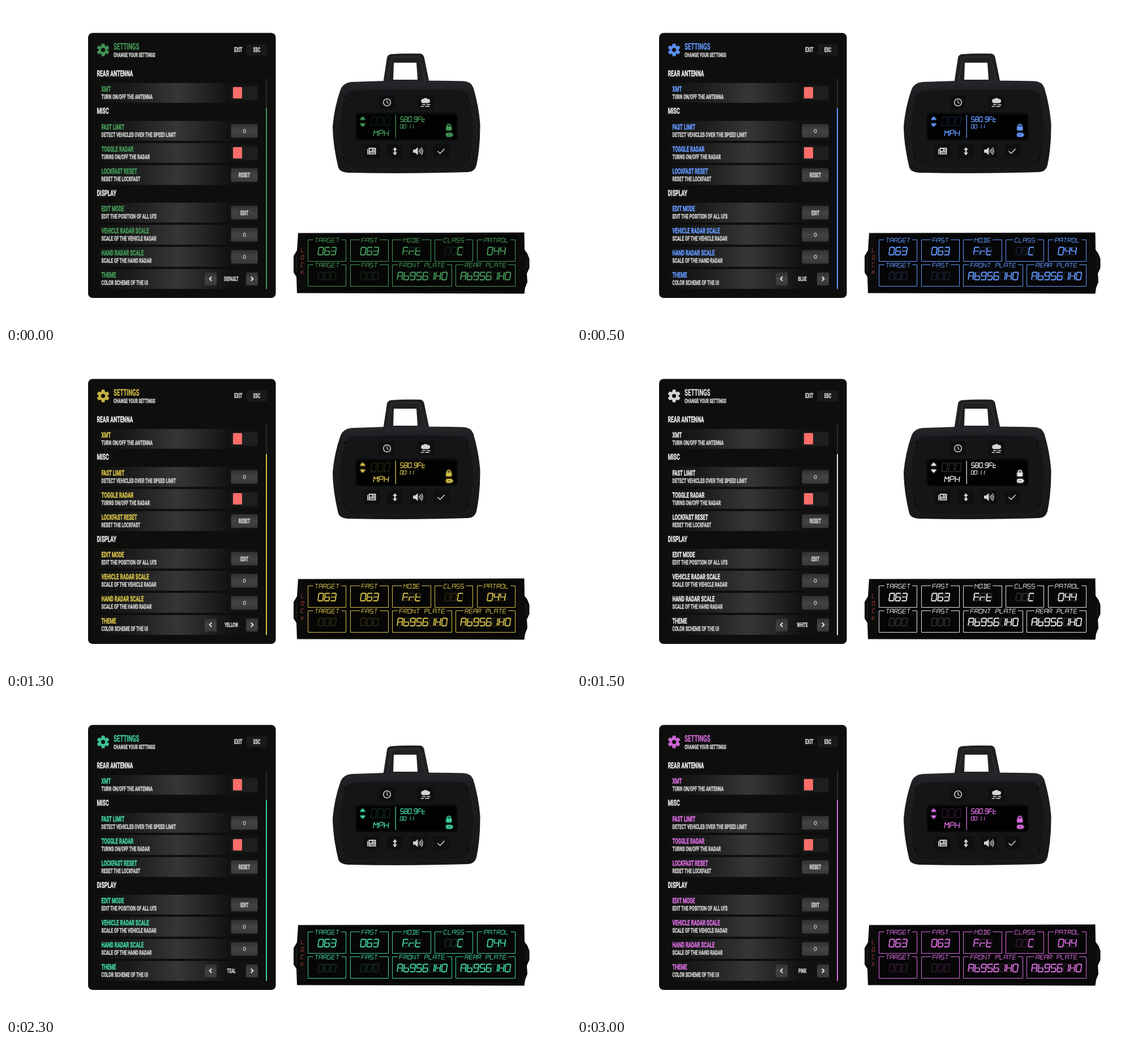
Recreate the animation shown at these times as an HTML page. Size 998 px wide and 561 px high, loop 3500 ms.

```html
<!DOCTYPE html>
<html lang="en">
<head>
<meta charset="utf-8">
<title>Radar settings themes</title>
<style>
html, body { margin: 0; width: 100%; height: 100%; overflow: hidden; background: #fff; }
svg { display: block; width: 998px; height: 561px; --c: #459a59; }
text { font: 700 11.25px Roboto, "Open Sans", sans-serif; fill: #cfcfcd; stroke: #cfcfcd; stroke-width: .55; text-rendering: geometricPrecision; }
.title { font-size: 16px; stroke-width: .2; }
.sub, .pick { font-size: 10.4px; }
.head { font-size: 14.4px; fill: #e8e8e6; stroke: #e8e8e6; }
.item { font-size: 13px; }
.item, .title { fill: var(--c); stroke: var(--c); }
.exit { font-size: 11.7px; }
.num { font: 500 9.5px Inter, sans-serif; stroke: none; fill: #ddd; }
.on { fill: var(--c); }
.line { fill: none; stroke: var(--c); }
.red { fill: none; stroke: #a23a32; }
.ghost { opacity: .2; }
.glow { filter: drop-shadow(0 0 1.5px var(--c)); }
.ico { fill: #d4d4d4; }
.ico-line { fill: none; stroke: #d4d4d4; stroke-width: 1.6; }
</style>
</head>
<body>
<svg id="stage" viewBox="0 0 998 561" xmlns="http://www.w3.org/2000/svg">
<defs>
  <linearGradient id="row">
    <stop offset="0" stop-color="#0f0f0e"/><stop offset=".2" stop-color="#1b1b1b"/>
    <stop offset=".5" stop-color="#363636"/><stop offset=".62" stop-color="#2a2a2a"/>
    <stop offset=".82" stop-color="#121212"/><stop offset="1" stop-color="#101010"/>
  </linearGradient>
  <linearGradient id="btn" x2="0" y2="1">
    <stop offset="0" stop-color="#303030"/><stop offset=".5" stop-color="#434343"/><stop offset="1" stop-color="#383838"/>
  </linearGradient>
  <linearGradient id="shell" x2="0" y2="1">
    <stop offset="0" stop-color="#25272a"/><stop offset=".15" stop-color="#1b1d1f"/><stop offset="1" stop-color="#161719"/>
  </linearGradient>
</defs>
<g id="panel"></g>
<g id="hand"></g>
<g id="bar"></g>
</svg>
<script>
const THEMES = [
  ['DEFAULT', '#459a59'], ['BLUE', '#6398ff'], ['YELLOW', '#d5c14a'], ['WHITE', '#e8e8e8'],
  ['TEAL', '#40d29e'], ['ORANGE', '#dba93f'], ['PINK', '#d96de0']
];
const STEP = 500;
const NARROW = 0.6;
const $ = id => document.getElementById(id);

const rect = (x, y, w, h, fill, r = 0) =>
  `<rect x="${x}" y="${y}" width="${w}" height="${h}" rx="${r}" fill="${fill}"/>`;
const path = (d, attrs) => `<path d="${d}" ${attrs}/>`;
const label = (s, x, y, cls, anchor = 'start', id = '') =>
  `<text class="${cls}" ${id && `id="${id}"`} text-anchor="${anchor}" transform="translate(${x} ${y}) scale(${NARROW} 1)">${s}</text>`;

// Fourteen-segment display: x 0..1, y 0..2
const SEG = {
  a: [0, 0, 1, 0], b: [1, 0, 1, 1], c: [1, 1, 1, 2], d: [0, 2, 1, 2], e: [0, 1, 0, 2], f: [0, 0, 0, 1],
  g: [0, 1, .5, 1], h: [.5, 1, 1, 1], i: [0, 0, .5, 1], j: [.5, 0, .5, 1], k: [1, 0, .5, 1],
  m: [.5, 1, .5, 2], n: [.5, 1, 1, 2]
};
const GLYPH = {
  0: 'abcdef', 1: 'bc', 3: 'abcdgh', 4: 'bcfgh', 5: 'acdfgh', 6: 'acdefgh', 8: 'abcdefgh', 9: 'abcdfgh',
  A: 'abcefgh', b: 'cdefgh', C: 'adef', D: 'abcdjm', E: 'adefgh', F: 'aefgh', G: 'acdefh', H: 'bcefgh',
  K: 'efgkn', L: 'def', M: 'bcefik', N: 'bcefin', O: 'abcdef', P: 'abefgh', R: 'abefghn', S: 'acdfgh',
  T: 'ajm', r: 'egh', t: 'defgh'
};

function lcd(s, x, y, h, pitch, cls = 'line', sw = 1) {
  const w = pitch * .74, slant = .13;
  let d = '';
  const pt = (px, py) => `${(x + px * w + (2 - py) * h / 2 * slant).toFixed(2)} ${(y + py * h / 2).toFixed(2)}`;
  for (const ch of s) {
    if (ch === '.' || ch === ':') {
      for (const py of ch === '.' ? [2] : [.6, 1.5]) d += `M${pt(0, py)}h${sw}`;
      x += pitch * .42;
      continue;
    }
    for (const k of GLYPH[ch] || '') {
      const [x1, y1, x2, y2] = SEG[k], t = .04;
      d += `M${pt(x1 + (x2 - x1) * t, y1 + (y2 - y1) * t)}L${pt(x2 - (x2 - x1) * t, y2 - (y2 - y1) * t)}`;
    }
    x += pitch;
  }
  return path(d, `class="${cls}" stroke-width="${sw}"`);
}

function drawPanel() {
  let out = rect(145, 47.5, 331.5, 467.5, '#0e0e0d', 8);
  let gear = '<circle r="8" class="on"/>';
  for (let a = 0; a < 360; a += 60)
    gear += path('M-3.3 -6L-2.4 -10.8H2.4L3.3 -6Z', `class="on" stroke="var(--c)" stroke-width=".6" stroke-linejoin="round" transform="rotate(${a})"`);
  out += `<g transform="translate(171.5 77.5)" opacity=".92">${gear}<circle r="3.6" fill="#0e0e0d"/></g>`;
  out += label('SETTINGS', 190, 76.6, 'title') + label('CHANGE YOUR SETTINGS', 190, 89.8, 'sub');
  out += label('EXIT', 403, 81.3, 'exit') + rect(425, 68, 36, 19, '#191a1b', 2) + label('ESC', 443, 81.1, '', 'middle');
  out += label('REAR ANTENNA', 160.5, 124, 'head') + label('MISC', 160.5, 190.2, 'head') + label('DISPLAY', 160.5, 335.3, 'head');

  const rows = [
    [153.2, 'XMT', 'TURN ON/OFF THE ANTENNA', 'toggle'],
    [220.2, 'FAST LIMIT', 'DETECT VEHICLES OVER THE SPEED LIMIT', '0'],
    [259.2, 'TOGGLE RADAR', 'TURNS ON/OFF THE RADAR', 'toggle'],
    [298.2, 'LOCKFAST RESET', 'RESET THE LOCKFAST', 'RESET'],
    [364.5, 'EDIT MODE', "EDIT THE POSITION OF ALL UI'S", 'EDIT'],
    [403.5, 'VEHICLE RADAR SCALE', 'SCALE OF THE VEHICLE RADAR', '0'],
    [442.5, 'HAND RADAR SCALE', 'SCALE OF THE HAND RADAR', '0'],
    [481.5, 'THEME', 'COLOR SCHEME OF THE UI', 'theme']
  ];
  for (const [c, name, about, kind] of rows) {
    out += rect(161, c - 17.5, 284, 35, 'url(#row)', 2);
    out += label(name, 168.5, c - 2.6, 'item') + label(about, 168.5, c + 10.7, 'desc');
    if (kind === 'toggle') {
      out += rect(398, c - 11.7, 46.5, 24, '#1e1e1e', 2) + rect(401, c - 10.2, 16, 20, '#fd6d69', 1.5);
    } else if (kind === 'theme') {
      for (const [x, s] of [[351, -1], [424, 1]]) {
        out += rect(x, c - 11.5, 21, 23, 'url(#btn)', 2);
        out += path(`M${x + 10.5 - s * 1.7} ${c - 4}l${s * 3.6} 3.7l${-s * 3.6} 3.7`, 'fill="none" stroke="#eee" stroke-width="1.8"');
      }
      out += label('', 398, c + 3.4, 'pick', 'middle', 'pick');
    } else {
      out += rect(397.5, c - 12, 47, 24, 'url(#btn)', 2);
      out += kind === '0'
        ? `<text class="num" x="421" y="${c + 3.4}" text-anchor="middle">0</text>`
        : label(kind, 421, c + 4, '', 'middle');
    }
  }
  out += rect(459, 128, 2, 371, '#2b2b2b', 1) + rect(459, 180, 2, 319.5, 'var(--c)', 1);
  $('panel').innerHTML = out;
}

function drawHand() {
  let out = path('M666.5 134L673 91Q674 86 680 85Q706 83 732 84Q737 85 738.5 90L747.5 134Z M685 100L684 130H727L725 100Z',
    'fill="#1f2022" fill-rule="evenodd"');
  out += path('M674 131L681 93Q682 90 686 90H726Q730 90 731 93L740 131', 'fill="none" stroke="#303235" stroke-width="1.5"');
  out += path('M610 134Q707 130 808 132.5Q821 133 825.5 144Q835 176 837.5 208Q838 248 831 281Q828 292.5 816 293Q707 296.5 603 294Q590 293 587 285Q577.5 246 577 212Q580 178 591 147Q595 136 610 134Z', 'fill="url(#shell)"');
  out += path('M613 149Q707 145 803 148Q814 149 817 160Q825 187 826 211Q826 245 820 272Q817 284 806 285Q707 288 610 285Q598 284 595 273Q588 242 589 212Q591 185 598 161Q602 150 613 149Z',
    'fill="#141517" stroke="#1d1f21" stroke-width="1.2"');
  for (const [x, y] of [[600, 160], [814, 159], [597, 268], [817, 268]])
    out += `<circle cx="${x}" cy="${y}" r="2" fill="#070708"/>`;
  for (const [x, y] of [[673, 170], [741, 170], [646, 256], [687, 256], [728, 256], [769, 256]])
    out += rect(x - 14, y - 12, 28, 24, '#0e0f10', 3);

  out += '<circle cx="673" cy="170" r="6.3" class="ico-line"/>' + path('M673 166V170.3L675.7 172', 'class="ico-line" style="stroke-width:1.3"');
  for (const [x, y, r] of [[737, 167.5, 3.8], [741, 166.3, 4], [745.5, 167.5, 3.6]])
    out += `<circle cx="${x}" cy="${y}" r="${r}" class="ico"/>`;
  out += rect(736, 168, 10, 3.3, '#d4d4d4');
  out += path('M735 174H741M743 174H749.5M732.5 177.2H738M740 177.2H748', 'class="ico-line"');

  out += rect(640.5, 250, 13, 12, '#d4d4d4', 1.2) + rect(638, 252, 1.6, 10, '#d4d4d4', .8);
  out += rect(642.5, 252, 4, 3.5, '#111') + path('M648 252.5H652M648 255H652M642.5 258H652M642.5 260.2H652', 'fill="none" stroke="#111" stroke-width=".9"');
  out += path('M687 249L691 254H688.2V258.5H691L687 263.5L683 258.5H685.8V254H683Z', 'class="ico"');
  out += path('M719 253.3H722.5L727.5 249V263L722.5 258.7H719Z', 'class="ico"');
  out += path('M729.5 253.5Q731.5 256 729.5 258.5M731.5 251.3Q735 256 731.5 260.7M733.6 249.3Q738.5 256 733.6 262.7', 'class="ico-line" style="stroke-width:1.4"');
  out += path('M762.5 256L766.8 260.2L774.5 252', 'class="ico-line"');

  out += rect(617, 188, 181, 49, '#0a0b0b', 7) + rect(620, 191.5, 176, 43, '#020202', 5);
  out += lcd('000', 644, 195.5, 15.5, 12, 'line ghost', 1.5);
  let lit = path('M630 195L635 200.5H625ZM630 213L635 207.5H625Z', 'class="on"');
  lit += rect(777.5, 213, 9.5, 6.2, 'var(--c)', 1) + path('M779.3 213.5V211.5A2.9 2.9 0 0 1 785.1 211.5V213.5', 'class="line" stroke-width="1.4"');
  lit += rect(777.5, 224, 10.5, 6.5, 'var(--c)', 1.8) + rect(788, 226, 1.3, 2.5, 'var(--c)');
  out += `<g class="glow">${lit}</g>` + path('M780 227.2H785.5', 'stroke="#000" stroke-width="2" opacity=".35"');
  out += rect(687.5, 192, 1.3, 41, 'var(--c)');
  out += lcd('MPH', 649, 219.5, 10, 9.4, 'line', 1.5);
  out += lcd('580.9Ft', 696, 195.5, 8.5, 7.1, 'line', 1.3) + lcd('00:11', 696, 209, 7, 5.6, 'line', 1.1);
  $('hand').innerHTML = out;
}

function drawBar() {
  let out = path('M516 400.5L915.5 399.5L916 430L921 437L924.5 446V462L920 472L921 487L917 497L915.5 507.5L514 506.5L513 478L508 470V441L514 431Z', 'fill="#0b0b0c"');
  out += path('M513 441V470M919.5 443V465', 'stroke="#1c1c1d" stroke-width="2" fill="none"');
  out += rect(530, 404, 374, 98, '#060606', 2);
  [...'LOCK'].forEach((ch, i) => { out += lcd(ch, 521, 427 + i * 13, 7, 5.6, 'red', 1); });

  const cells = [
    [533.5, 0, 67, 'TARGET', '063'], [608.5, 0, 67, 'FAST', '063'], [682.5, 0, 68, 'MODE', 'Frt'],
    [757.5, 0, 67, 'CLASS', '  C'], [832.5, 0, 67, 'PATROL', '044'],
    [533.5, 1, 67, 'TARGET', '   '], [608.5, 1, 67, 'FAST', '   '],
    [682.5, 1, 105, 'FRONT PLATE', 'Ab9561H0'], [794.5, 1, 105, 'REAR PLATE', 'Ab9561H0']
  ];
  for (const [x, row, w, name, value] of cells) {
    const y = 412.5 + row * 44, mid = x + w / 2, half = name.length * 3.7;
    out += path(`M${mid - half - 2} ${y}H${x}V${y + 38}H${x + w}V${y}H${mid + half + 3}`, 'class="line" stroke-width="1"');
    out += lcd(name, mid - half + .6, y - 3, 7.5, 7.4, 'line', 1);
    const vx = mid - value.length * 5.6 + .8, vy = y + 13.2;
    out += lcd('0'.repeat(value.length), vx, vy, 13.3, 11.2, 'line ghost', 1.7);
    out += lcd(value, vx, vy, 13.3, 11.2, 'line', 1.9);
  }
  $('bar').innerHTML = out;
}

drawPanel();
drawHand();
drawBar();

let shown = -1;
function draw(ms) {
  const i = Math.floor(ms / STEP) % THEMES.length;
  if (i !== shown) {
    shown = i;
    $('stage').style.setProperty('--c', THEMES[i][1]);
    $('pick').textContent = THEMES[i][0];
  }
}
const start = performance.now();
function tick() {
  draw(performance.now() - start);
  requestAnimationFrame(tick);
}
tick();
</script>
</body>
</html>
```
